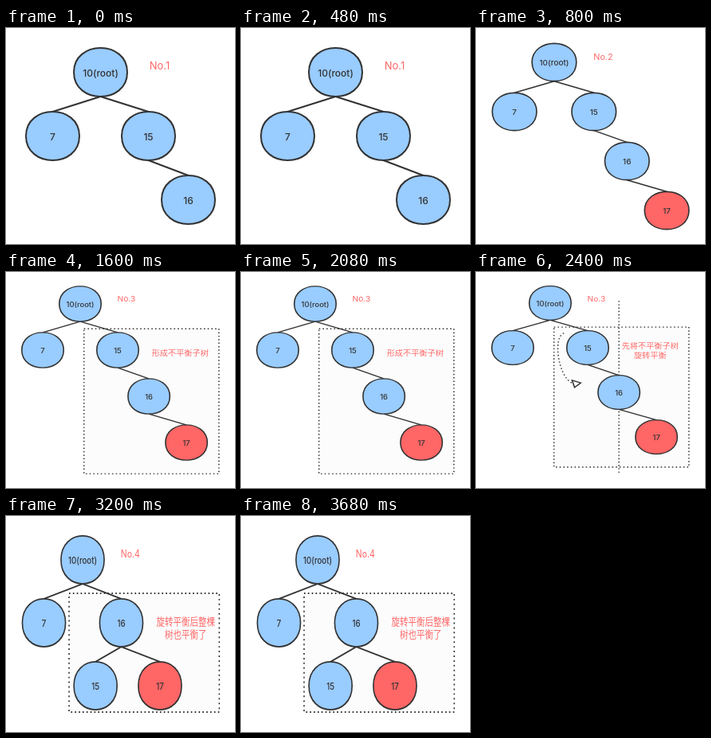
An HTML page that plays this animation: 287 by 271 pixels, repeating every 4 s.

```html
<!DOCTYPE html>
<html lang="zh">
<head>
<meta charset="utf-8">
<title>Tree rotation</title>
<style>
  html, body { margin: 0; width: 100%; height: 100%; overflow: hidden; background: #fff; }
  svg { display: block; width: 287px; height: 271px; }
  .scene { visibility: hidden; animation: show 4s step-end calc(var(--i) * .8s - 4s) infinite; }
  @keyframes show {
    0% { visibility: visible; }
    20%, 100% { visibility: hidden; }
  }
  .node, .edge, .box, .dots, .head { stroke: #323232; stroke-width: 2; }
  .node { fill: #9cf; }
  .new { fill: #f66; }
  .edge, .dots { fill: none; }
  .box { fill: #fcfcfc; }
  .head { fill: #fff; }
  .box, .dots { stroke-dasharray: 2 4; }
  text { font: 500 12px Inter, "Noto Sans CJK SC", sans-serif; fill: #323232; text-anchor: middle; }
  .note { font: 13px Inter, "Noto Sans CJK SC", "Noto Sans CJK", sans-serif; fill: #f66; }
</style>
</head>
<body>
<svg viewBox="0 0 287 271"></svg>
<script>
  // Coordinates are relative to the root node; each scene has its own scale.
  const ellipse = 'M-33.5 0C-33.5 -40.67 33.5 -40.67 33.5 0C33.5 40.67 -33.5 40.67 -33.5 0Z';
  const node = (x, y, label, cls = '') =>
    `<g transform="translate(${x} ${y})"><path class="node ${cls}" d="${ellipse}"/><text y="5">${label}</text></g>`;
  const edge = (x1, y1, x2, y2) =>
    `<path class="edge" d="M${x1} ${y1 + 30.5}L${x2} ${y2 - 30.5}"/>`;
  const note = (x, y, str) => `<text class="note" x="${x}" y="${y}">${str}</text>`;
  const box = (x, y, w, h) => `<rect class="box" x="${x}" y="${y}" width="${w}" height="${h}"/>`;

  const top2 = right =>
    edge(0, 0, -60, 80) + edge(0, 0, 60, 80) +
    node(0, 0, '10(root)') + node(-60, 80, 7) + node(60, 80, right);
  const three = top2(15) + edge(60, 80, 110, 160) + node(110, 160, 16);
  const chain = three + edge(110, 160, 170, 240) + node(170, 240, 17, 'new');
  const balanced = top2(16) + edge(60, 80, 20, 160) + edge(60, 80, 120, 160) +
    node(20, 160, 15) + node(120, 160, 17, 'new');
  const axis = '<path class="dots" d="M110 -4V307"/>';
  const turn = '<path class="dots" d="M22 54C4 60 12 132 36 144"/>' +
    '<path class="head" d="M49 143L35 138.5L39 151Z"/>';

  const scenes = [
    [118.5, 55.5, 1, 1, three + note(74, -3.5, 'No.1')],
    [98, 43, .83, .775, chain + note(74, -3.5, 'No.2')],
    [93, 40, .783, .725, box(6, 43, 216, 251) + chain +
      note(74, -3.5, 'No.3') + note(160, 90, '形成不平衡子树')],
    [93, 39, .783, .7, box(6, 43, 216, 251) + axis + chain + turn +
      note(74, -3.5, 'No.3') + note(160, 82, '先将不平衡子树') + note(160, 98, '旋转平衡')],
    [96, 55, .808, .9875, box(-21, 42.5, 233, 151) + balanced +
      note(74, -3.5, 'No.4') + note(160, 83, '旋转平衡后整棵') + note(160, 99, '树也平衡了')]
  ];

  document.querySelector('svg').innerHTML = scenes.map(([x, y, sx, sy, art], i) =>
    `<g class="scene" style="--i:${i}" transform="translate(${x} ${y}) scale(${sx} ${sy})">${art}</g>`).join('');
</script>
</body>
</html>
```
